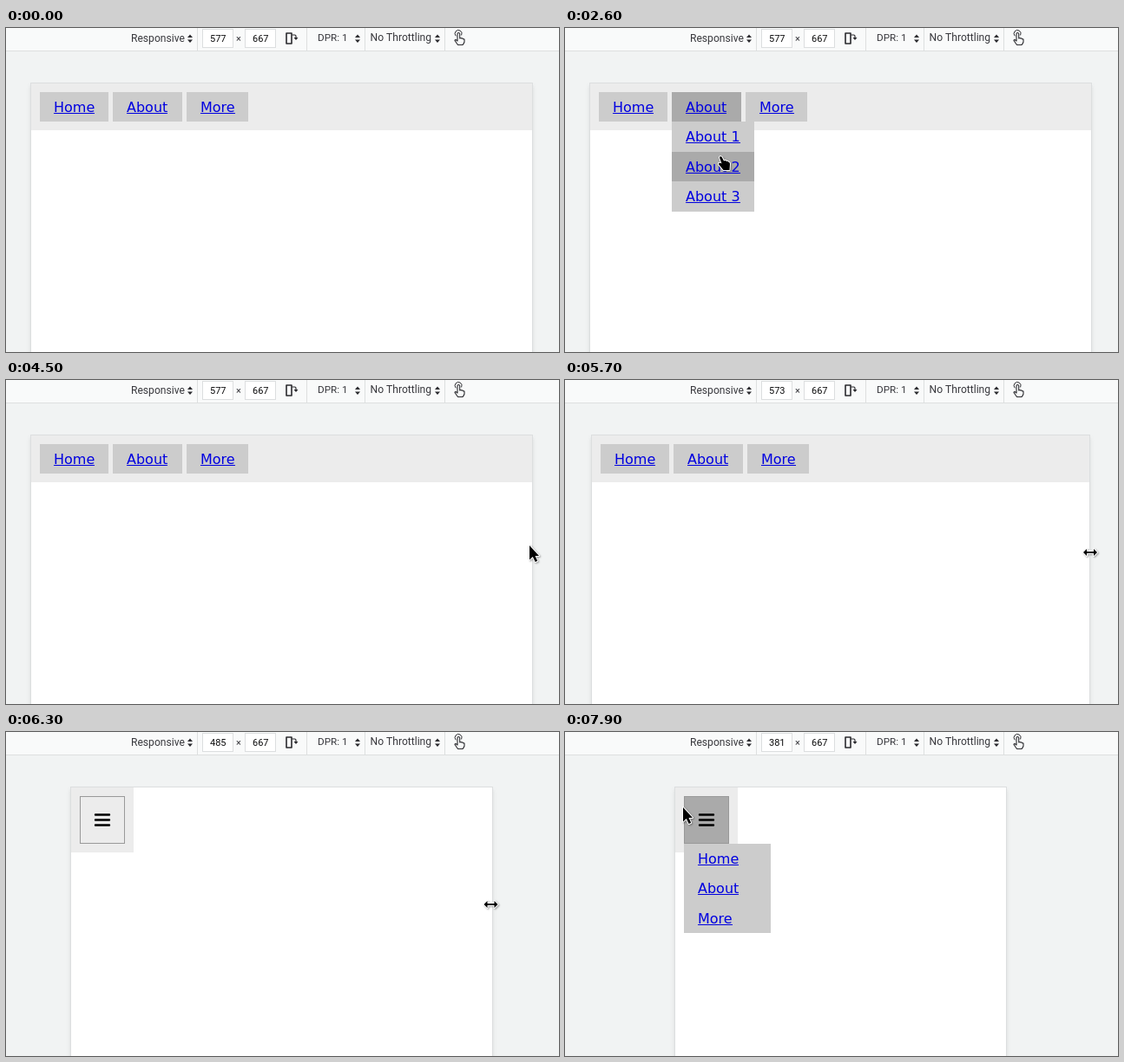
An HTML page with a canvas that plays this animation: 637x374 px, repeating every 8 s.

```html
<!DOCTYPE html>
<html lang="en">
<head>
<meta charset="utf-8">
<title>Responsive menu</title>
<style>
html, body { margin: 0; width: 100%; height: 100%; overflow: hidden; background: #f1f3f3; }
canvas { display: block; }
</style>
</head>
<body>
<canvas id="stage" width="637" height="374"></canvas>
<script>
const ctx = document.getElementById('stage').getContext('2d');
const LOOP = 8000, TICK = 100, BREAKPOINT = 500;
const UI = 'Roboto, sans-serif', PAGE = '16px "DejaVu Sans", sans-serif';
const PAD = 16, ROW = 34.5;

// name, offset from the page edge, width, submenu width
const MENU = [['Home', 10, 79, 0], ['About', 94, 80, 95], ['More', 179, 71, 87]];

// time, x, y, what the pointer is on
const POINTER = [
  [0, -50, -50, ''],
  [1100, 72, 16, ''], [1200, 77, 44, ''], [1300, 85, 74, 'Home'], [1400, 92, 85, 'Home'],
  [1600, 98, 88, 'Home'], [1800, 102, 89, 'Home'], [1900, 163, 93, 'About'],
  [2100, 164, 112, 'About 1'], [2200, 165, 130, 'About 1'], [2300, 166, 149, 'About 2'],
  [2400, 167, 161, 'About 2'], [2600, 180, 148, 'About 2'], [2700, 200, 126, 'About 1'],
  [2800, 224, 115, ''], [3000, 246, 92, 'More'], [3500, 244, 95, 'More'],
  [3600, 243, 98, 'More'], [3800, 340, 140, ''], [3900, 508, 195, ''],
  [4100, 514, 195, ''], [4300, 545, 194, ''], [4400, 580, 192, ''], [4500, 603, 191, ''],
  [4900, 606, 194, ''], [5000, 610, 199, 'edge'], [5300, 607.5, 199, 'edge'],
  [7300, 508, 210, ''], [7400, 465, 270, ''], [7500, 390, 311, ''], [7600, 300, 255, ''],
  [7700, 215, 170, ''], [7800, 160, 105, 'Menu'], [7900, 136, 87, 'Menu']
];

// time, viewport width, pointer x
const DRAG = [
  [5600, 577, 607.5], [5700, 573, 605], [6000, 542, 588], [6300, 485, 558.5],
  [6500, 445, 547], [6800, 383, 500], [6900, 383, 500], [7000, 381, 500]
];

function track(keys, t, col) {
  const i = keys.findIndex(k => k[0] > t);
  if (i === 0) return keys[0][col];
  if (i < 0) return keys[keys.length - 1][col];
  const a = keys[i - 1], b = keys[i];
  return a[col] + (b[col] - a[col]) * (t - a[0]) / (b[0] - a[0]);
}

function rect(x, y, w, h, fill, border) {
  ctx.fillStyle = fill;
  ctx.fillRect(x, y, w, h);
  if (!border) return;
  ctx.strokeStyle = border;
  ctx.lineWidth = 1;
  ctx.strokeRect(x + .5, y + .5, w - 1, h - 1);
}

function label(text, x, y, size = 12, color = '#38383d') {
  ctx.font = `${size}px ${UI}`;
  ctx.fillStyle = color;
  ctx.fillText(text, x, y);
}

function link(text, x, y) {
  ctx.font = PAGE;
  ctx.fillStyle = '#0000e0';
  ctx.fillText(text, x, y);
  ctx.fillRect(x, y + 1, Math.round(ctx.measureText(text).width), 1);
}

function stroke(path, x, y, width, color = '#2a2a2e') {
  ctx.save();
  ctx.translate(x, y);
  ctx.strokeStyle = color;
  ctx.lineWidth = width;
  ctx.lineJoin = ctx.lineCap = 'round';
  ctx.stroke(new Path2D(path));
  ctx.restore();
}

function fill(path, x, y, color = '#2a2a2e') {
  ctx.save();
  ctx.translate(x, y);
  ctx.fillStyle = color;
  ctx.fill(new Path2D(path));
  ctx.restore();
}

function toolbar(width) {
  rect(0, 0, 637, 26, '#f9fafa');
  rect(0, 26, 637, 1, '#dddfdf');
  for (const x of [220, 346, 413, 505]) rect(x, 0, 1, 26, '#dddfdf');
  label('Responsive', 144, 16, 12.1);
  label('DPR: 1', 359, 15, 11.7);
  label('No Throttling', 419.5, 15, 12.1);
  for (const x of [212, 405, 497]) fill('M-3-1L0-4.5 3-1ZM-3 1.5L0 5 3 1.5Z', x, 12);
  for (const [x, value] of [[226, width], [275, 667]]) {
    rect(x, 1, 36, 22, '#fff', '#dcdedf');
    label(value, x + 9, 16, 11, '#0c0c0d');
  }
  label('×', 265, 16, 11);
  stroke('M0 0H6V12H0Z', 323, 6, 1.6);
  stroke('M0 0H2.5Q4 0 4 1.5V4', 330, 8, 1.2);
  fill('M-2.5 0H2.5L0 3Z', 334, 11);
  stroke('M-2 3V-5Q-2-6.5-.7-6.5T.7-5V0Q2-1.2 3 .2 4-.8 5 1 6.2.5 6 2V4Q5.5 6 4 7.5H-1.5L-5 2.5Q-4.5.5-2 3', 522, 12, 1.1);
  stroke('M-4-3A4 4 0 1 1 2.8-4', 522, 12, 1);
}

function dropdown(items, x, top, width, hover) {
  items.forEach((text, i) => {
    const y = Math.round(top + i * ROW), end = Math.round(top + (i + 1) * ROW);
    rect(x, y, width, end - y, text === hover ? '#aaa' : '#ccc');
    link(text, x + PAD, Math.round(top + 23 + i * ROW));
  });
}

function wideMenu(left, width, hover) {
  rect(left, 64, width, 54, '#ececec');
  for (const [name, dx, w, subWidth] of MENU) {
    const x = left + dx, open = hover.startsWith(name);
    rect(x, 74, w, 34, open ? '#aaa' : '#ccc');
    link(name, x + PAD, 97);
    if (open && subWidth) dropdown([1, 2, 3].map(n => `${name} ${n}`), x, 108.3, subWidth, hover);
  }
}

function narrowMenu(left, open) {
  rect(left, 64, 72, 75, '#ececec');
  rect(left + 10, 74, 52, 55, open ? '#aaa' : '#ececec', '#999');
  stroke('M0 0H16M0 6H16M0 12H16', left + 28, 95.5, 2.4, '#000');
  if (open) dropdown(MENU.map(m => m[0]), left + 10, 128.8, 100, '');
}

const CURSORS = {
  arrow: 'M0 0V16.5L3.8 13 6.7 19 9.2 17.8 6.5 12H11Z',
  hand: 'M-2 1.5Q-1.5-.5 .5 .8L3 5.5Q5 4.5 6 6 8 5.2 8.5 7 10 6.8 10 9L9.5 16H2.5L-2.8 9.5Q-3.5 7.5-1 7.8L.5 8.5Z',
  resize: 'M-8 0L-4-4V-1H4V-4L8 0 4 4V1H-4V4Z'
};

function cursor(x, y, on) {
  const kind = on === 'edge' ? 'resize' : on && on !== 'Menu' ? 'hand' : 'arrow';
  ctx.save();
  ctx.shadowColor = 'rgba(0,0,0,.35)';
  ctx.shadowBlur = 2;
  ctx.shadowOffsetX = ctx.shadowOffsetY = 1;
  stroke(CURSORS[kind], x, y, 2, '#fff');
  ctx.restore();
  fill(CURSORS[kind], x, y, '#000');
}

function draw(now) {
  const t = Math.floor(now % LOOP / TICK) * TICK;
  const width = 2 * Math.round((track(DRAG, t, 1) - 1) / 2) + 1;
  const left = (635 - width) / 2;
  let [since, x, y, on] = POINTER.findLast(p => p[0] <= t);
  if (on === 'edge' && t >= 5700) x = track(DRAG, t, 2);

  rect(0, 0, 637, 374, '#f1f3f3');
  toolbar(width);
  ctx.save();
  ctx.shadowColor = 'rgba(155,155,155,.26)';
  ctx.shadowBlur = 4;
  ctx.shadowOffsetY = 4;
  rect(left - 1, 63, width + 2, 400, '#dcdedf');
  ctx.restore();
  rect(left, 64, width, 400, '#fff');
  if (width > BREAKPOINT) wideMenu(left, width, on);
  else narrowMenu(left, on === 'Menu');
  cursor(x, y, on);
  requestAnimationFrame(draw);
}
requestAnimationFrame(draw);
</script>
</body>
</html>
```
